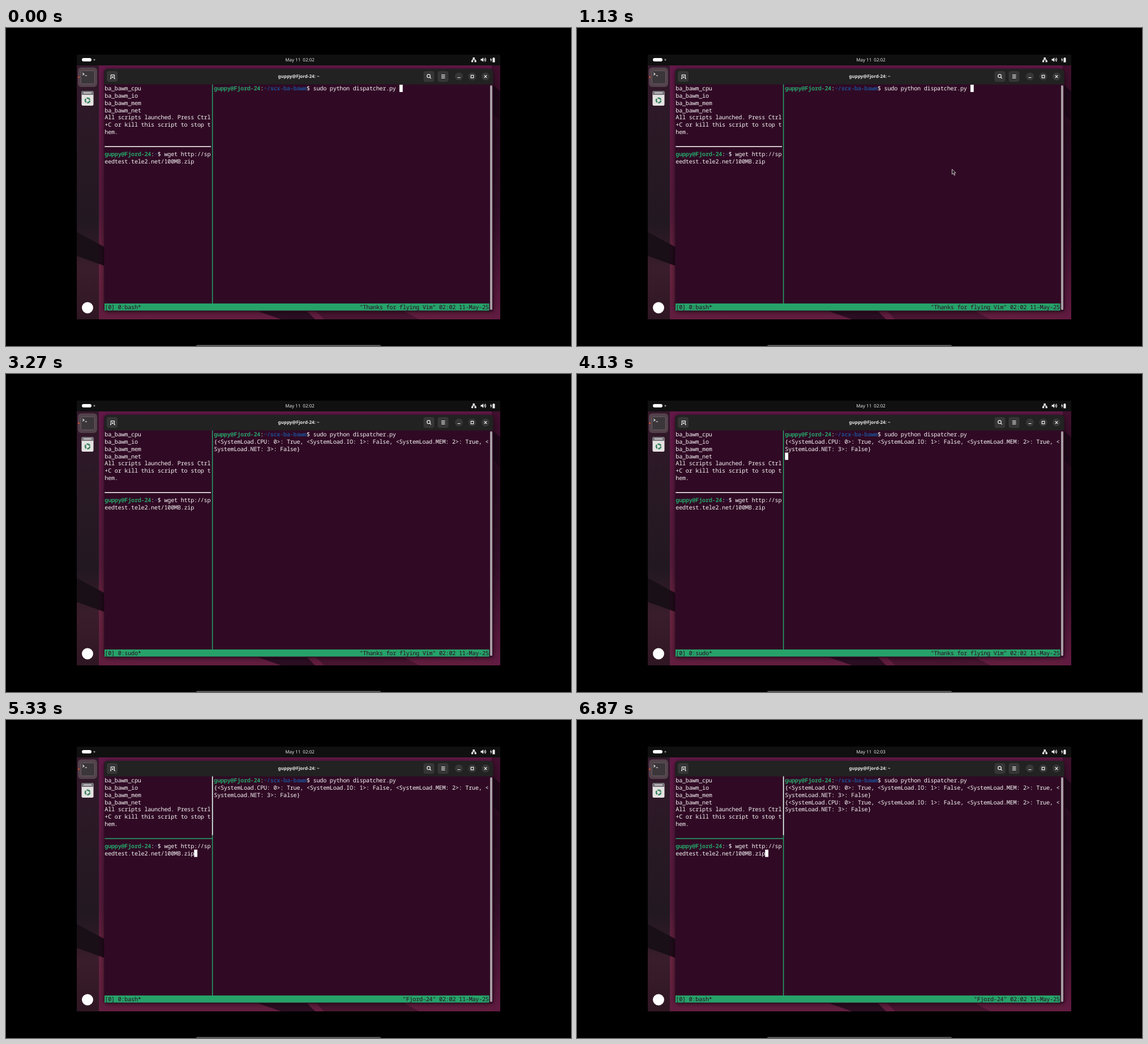
Write an HTML page that moves like this. It is 998 by 561 pixels and loops after 8000 ms.

```html
<!DOCTYPE html>
<html lang="en">
<head>
<meta charset="utf-8">
<title>Terminal session</title>
<style>
  html, body { margin: 0; width: 100%; height: 100%; overflow: hidden; background: #000; }
  svg { display: block; width: 998px; height: 561px; }
  text { white-space: pre; text-rendering: geometricPrecision; }
  .mono { font: 10.2px "Noto Sans Mono", monospace; letter-spacing: -.27px; fill: #f7f5f6; }
  .ui { font: 500 8px "Noto Sans", sans-serif; fill: #e6e6e6; text-anchor: middle; }
  .user { font-weight: 700; fill: #26a269; }
  .path { font-weight: 700; fill: #1c4c8f; }
  .status { fill: #2b0a22; }
  .line { fill: none; stroke: #f2f2f2; stroke-width: 1.2; }
  .shadow { filter: drop-shadow(0 1px 4px rgba(0, 0, 0, .6)); }
</style>
</head>
<body>
<svg viewBox="0 0 998 561">
  <defs>
    <linearGradient id="wall" x1="0" y1="0" x2="0" y2="1">
      <stop offset="0" stop-color="#65194a"/>
      <stop offset=".6" stop-color="#541a3a"/>
      <stop offset=".8" stop-color="#67243f"/>
      <stop offset="1" stop-color="#621d3f"/>
    </linearGradient>
    <linearGradient id="right" x1="0" y1="0" x2="0" y2="1">
      <stop offset="0" stop-color="#42102f"/>
      <stop offset=".25" stop-color="#260a1e"/>
      <stop offset=".6" stop-color="#340f29"/>
      <stop offset="1" stop-color="#621b42"/>
    </linearGradient>
    <linearGradient id="dock" x1="0" y1="0" x2="0" y2="1">
      <stop offset="0" stop-color="#34182b"/>
      <stop offset=".3" stop-color="#291925"/>
      <stop offset=".62" stop-color="#221821"/>
      <stop offset=".8" stop-color="#3a1d2b"/>
      <stop offset="1" stop-color="#2f1623"/>
    </linearGradient>
    <clipPath id="desktop"><path d="M125 47H873V514H125Z"/></clipPath>
  </defs>

  <g clip-path="url(#desktop)">
    <path fill="url(#wall)" d="M125 47H873V514H125Z"/>
    <path fill="url(#right)" d="M858 66H873V514H858Z"/>
    <path fill="#1f0819" d="M858 98L873 112V165L858 150Z"/>
    <path fill="#1f0b19" d="M164 381L175 387V420L164 416Z"/>
    <path fill="#2c0e23" d="M440 498H530L546 514H486Z"/>
    <path fill="#481530" d="M546 498H700L730 514H562Z"/>
    <rect class="shadow" x="173.5" y="72" width="687" height="428" rx="6" fill="#300a24"/>
    <path fill="url(#dock)" d="M125 66H164V514H125Z"/>
    <path fill="#190f16" d="M125 360L164 381V416L125 402Z"/>
    <path fill="#101010" d="M125 47H873V66H125Z"/>
  </g>

  <!-- top bar -->
  <rect x="134" y="53" width="17" height="6" rx="3" fill="#fff"/>
  <circle cx="156" cy="56" r="1.6" fill="#858585"/>
  <text id="clock" class="ui" x="519" y="58.8"></text>
  <g fill="#f2f2f2">
    <path d="M824.5 52h3.4v3h-3.4zM822 57.3h3.2v3H822zM827.6 57.3h3.2v3h-3.2z"/>
    <path class="line" d="M826.2 55v1.2M823.6 57.4v-1.2h5.6v1.2"/>
    <path d="M838.5 54.5h2l2.6-2.5v8l-2.6-2.5h-2z"/>
    <path class="line" d="M844.6 54q1.5 2 0 4M846.2 52.5q2.6 3.5 0 7"/>
    <path d="M859.5 53h1v-1h2v1h1v7.5h-4zM857 52l-2 4.5h1.7l-.8 4 2.7-5h-1.7z"/>
  </g>

  <!-- dock -->
  <rect x="127" y="69.5" width="34" height="34.5" rx="6" fill="#53424b"/>
  <rect x="132.5" y="75.5" width="24" height="23" rx="2.5" fill="#3b3639" stroke="#665b60"/>
  <path class="line" d="M135.3 79.3l2.6 2-2.6 2M139.5 84h3.5"/>
  <circle cx="128.5" cy="86.8" r="1.3" fill="#e95420"/>
  <rect x="133.5" y="111" width="21" height="26" rx="2.5" fill="#e5e3e2"/>
  <path fill="#77757a" d="M133.5 118v-4.5q0-2.5 2.5-2.5h16q2.5 0 2.5 2.5v4.5z"/>
  <path stroke="#d8d6d8" stroke-width="1.8" d="M137 114.5h14"/>
  <circle cx="144" cy="127.7" r="4" fill="none" stroke="#39835f" stroke-width="2.6" stroke-dasharray="6.8 1.58"/>
  <circle cx="144" cy="493.5" r="10" fill="#fff"/>

  <!-- window -->
  <path fill="#300a24" d="M173.5 98H860.5V496q0 4-4 4H177.5q-4 0-4-4Z"/>
  <path fill="#222" d="M173.5 99.5V79q0-7 7-7H853.5q7 0 7 7V99.5Z"/>
  <g fill="#363636">
    <rect x="178" y="76" width="19" height="19" rx="4"/>
    <rect x="737.5" y="76" width="19" height="19" rx="4"/>
    <rect x="762.5" y="76" width="19" height="19" rx="4"/>
    <circle cx="800" cy="85.5" r="7"/>
    <circle cx="823.5" cy="85.5" r="7"/>
    <circle cx="847" cy="85.5" r="7"/>
  </g>
  <g class="line">
    <path d="M184 89.3h1.4v-6.5h6v6.5h1.4M188.4 85.2v3M186.9 86.700h3"/>
    <circle cx="746.5" cy="84.7" r="2.8"/>
    <path d="M748.5 86.8l2.4 2.4M769 82.8h6.500M769 85.5h6.500M769 88.2h6.500"/>
    <path d="M797.5 87.5h5M821.3 83.3h4.500v4.500h-4.500zM844.7 83.2l4.600 4.600M849.3 83.2l-4.600 4.600"/>
  </g>
  <text id="title" class="ui" x="517" y="88.3" style="font-weight:700"></text>
  <rect x="855" y="101" width="4" height="396.5" rx="2" fill="#a89ea5"/>

  <!-- terminal -->
  <path fill="#26a269" d="M174 486H853.5V498.500H174Z"/>
  <path fill="#26a269" d="M363.9 99.5h1.500V486h-1.500z"/>
  <path id="upperDivider" fill="#f7f5f6" d="M363.9 99.5h1.500V203h-1.500z"/>
  <path id="split"/>
  <g id="screen" class="mono"></g>
  <rect id="caret" width="5.8" height="12.9" fill="#fff"/>

  <rect x="336" y="559" width="326" height="4" rx="2" fill="#555"/>
  <path id="pointer" fill="#25121f" stroke="#dcd5d9" stroke-width=".9" stroke-linejoin="round"
        d="M.5.5V9.6L2.7 7.7 4.3 11.4 5.8 10.7 4.2 7.2 7 7Z"/>
</svg>

<script>
const LOOP = 8000, CELL_W = 5.85, CELL_H = 12.87, LEFT = 174.3, TOP = 100;
const RIGHT_PANE = 33, COLUMNS = 116;
const USER = "guppy", HOST = "Fjord-24";

const $ = id => document.getElementById(id);
const cellX = col => LEFT + col * CELL_W;
const cellY = row => TOP + row * CELL_H;
const escapeText = s => s.replace(/&/g, "&amp;").replace(/</g, "&lt;");
const show = (id, on) => $(id).setAttribute("visibility", on ? "visible" : "hidden");

function addText(col, row, markup, id = "", cls = "") {
  $("screen").insertAdjacentHTML("beforeend",
    `<text id="${id}" class="${cls}" x="${cellX(col)}" y="${cellY(row) + 9.9}">${markup}</text>`);
}

const prompt = (path, command) =>
  `<tspan class="user">${USER}@${HOST}</tspan>:<tspan class="path">${path}</tspan>$ ${command}`;

["ba_bawm_cpu", "ba_bawm_io", "ba_bawm_mem", "ba_bawm_net",
 "All scripts launched. Press Ctrl", "+C or kill this script to stop t", "hem."]
  .forEach((line, row) => addText(0, row, line));
addText(0, 9, prompt("~", "wget http://sp"));
addText(0, 10, "eedtest.tele2.net/100MB.zip");
addText(RIGHT_PANE, 0, prompt("~/scx-ba-bawm", "sudo python dispatcher.py"));

const report = [
  "{<SystemLoad.CPU: 0>: True, <SystemLoad.IO: 1>: False, <SystemLoad.MEM: 2>: True, <",
  "SystemLoad.NET: 3>: False}"
];
for (let row = 1; row <= 4; row++)
  addText(RIGHT_PANE, row, escapeText(report[(row - 1) % 2]), "report" + row);

addText(0, 30, "", "task", "status");
addText(0, 30, "", "info", "status");
$("title").textContent = `${USER}@${HOST}: ~`;

function setInfo(label) {
  const text = `"${label}" 02:02 11-May-25`;
  $("info").textContent = text;
  $("info").setAttribute("x", cellX(COLUMNS - text.length));
}

function placeCaret(t) {
  const [col, row] = t < 2530 ? [RIGHT_PANE + 56, 0]
    : t < 3270 ? [RIGHT_PANE, 1]
    : t < 5270 ? [RIGHT_PANE, 3] : [27, 10];
  $("caret").setAttribute("x", cellX(col));
  $("caret").setAttribute("y", cellY(row));
  const blinkedOff = (t >= 3130 && t < 3800) || (t >= 6000 && t < 6870);
  show("caret", !blinkedOff);
}

// The pointer advances in ticks of a fifteenth of a second.
function placePointer(t) {
  const ticks = (start, count) => Math.max(0, Math.min(1, Math.floor((t - start + 5) / 66.7) / count));
  const sweep = 1 - (1 - ticks(800, 5)) ** 2;
  const nudge = ticks(1270 - 66.7, 3);
  const x = 910 - 248 * sweep - 39 * nudge;
  const y = 287 - 38.5 * sweep + 5 * nudge;
  $("pointer").setAttribute("transform", `translate(${x} ${y})`);
  show("pointer", t >= 800 && t < 2530);
}

function render(t) {
  const leftActive = t >= 5270;
  $("clock").textContent = t < 6470 ? "May 11  02:02" : "May 11  02:03";
  $("task").textContent = `[0] 0:${t >= 3270 && !leftActive ? "sudo" : "bash"}*`;
  setInfo(leftActive ? HOST : "Thanks for flying Vim");
  show("upperDivider", leftActive);
  $("split").setAttribute("d", `M174.3 208.5H${leftActive ? 365 : 362}v1.5H174.3z`);
  $("split").setAttribute("fill", leftActive ? "#26a269" : "#fff");
  for (let row = 1; row <= 4; row++) show("report" + row, t >= (row < 3 ? 3270 : 5670));
  placeCaret(t);
  placePointer(t);
}

const began = performance.now();
function frame() {
  render((performance.now() - began) % LOOP);
  requestAnimationFrame(frame);
}
frame();
</script>
</body>
</html>
```
